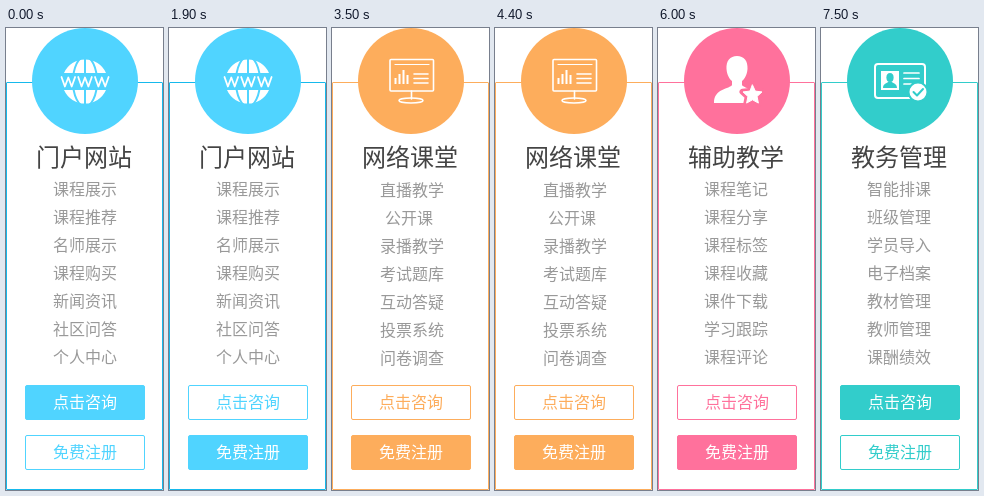
These frames come from a looping animation (157x462 px, 8000 ms). An HTML page:

```html
<!DOCTYPE html>
<html lang="zh-CN">
<head>
<meta charset="utf-8">
<style>
html, body { margin: 0; width: 157px; height: 462px; overflow: hidden; background: #fff; }
svg { display: block; }
text { font-family: "Noto Sans CJK SC", "Noto Sans CJK", sans-serif; text-anchor: middle; }
.icon { fill: none; stroke: #fff; stroke-linecap: round; stroke-linejoin: round; }
.solid { fill: #fff; stroke: none; }
</style>
</head>
<body>
<svg id="stage" width="157" height="462" viewBox="0 0 157 462"></svg>
<script>
const stage = document.getElementById('stage');
const LOOP = 8000, CARD_TIME = 2500, HOVER_AT = 1000;

const globe = c => `
  <path class="solid" d="M58 45A23 23 0 0 1 100 45ZM58 62A23 23 0 0 0 100 62Z"/>
  <g stroke="${c}" stroke-width="2">
    <path d="M79 29V46M79 61V78"/>
    <ellipse cx="79" cy="53.5" rx="12" ry="25"/>
  </g>
  <rect x="53" y="45" width="52" height="17" fill="${c}" stroke="none"/>
  <path stroke-width="1.8" d="${[55.5, 72.2, 89].map(x =>
    `M${x} 49l3.4 9.5 3.4-9 3.4 9 3.4-9.5`).join('')}"/>`;

const board = () => `
  <rect x="58" y="31.5" width="43.5" height="31.5" rx="1" stroke-width="1.6"/>
  <path stroke-width="1.2" d="M63 36.5H97"/>
  <path stroke-width="1.6" d="M79.5 63V71"/>
  <ellipse cx="79" cy="72.5" rx="12" ry="2.5" stroke-width="1.6"/>
  <path stroke-width="2" stroke-linecap="butt" d="M63.5 56V50M67.5 56V46M71.5 56V42M75.5 56V47"/>
  <path stroke-width="1.6" d="M82 46H96M82 50.5H96M82 55H96"/>`;

const star = (x, y, r) => Array.from({ length: 10 }, (_, i) => {
  const a = i * Math.PI / 5 - Math.PI / 2, d = i % 2 ? r * 0.48 : r;
  return (x + d * Math.cos(a)).toFixed(2) + ',' + (y + d * Math.sin(a)).toFixed(2);
}).join(' ');

const student = c => `
  <path class="solid" d="M79 28C86 28 90 33 89.5 41C89 47 86.5 51 84 53V57C86 61 101 60 102 75H56C56 60 72 61 74 57V53C71.5 51 69 47 68.5 41C68 33 72 28 79 28Z"/>
  <polygon points="${star(94.5, 67, 10.5)}" fill="#fff" stroke="${c}" stroke-width="6"/>
  <polygon points="${star(94.5, 67, 10)}" fill="#fff" stroke-width="1"/>`;

const badge = c => `
  <rect x="54" y="36" width="50" height="34" rx="3" stroke-width="2"/>
  <rect class="solid" x="60" y="43" width="18" height="19"/>
  <g fill="${c}" stroke="none">
    <ellipse cx="69" cy="49.5" rx="3.6" ry="4.5"/>
    <path d="M62 60C62 55 66 56 67.5 53.5H70.5C72 56 76 55 76 60Z"/>
  </g>
  <path stroke-width="1.7" d="M83 45H98M83 50.5H98M83 56H90"/>
  <circle cx="97" cy="64" r="9.5" fill="#fff" stroke="${c}" stroke-width="2"/>
  <path stroke="${c}" stroke-width="2" d="M92.5 64L96 67.5L102 61"/>`;

const cards = [
  { color: '#50d4ff', edge: '#16b9ec', icon: globe, title: '门户网站', x: 79, y: 167,
    items: '课程展示 课程推荐 名师展示 课程购买 新闻资讯 社区问答 个人中心' },
  { color: '#fdad5c', edge: '#fdad5c', icon: board, title: '网络课堂', x: 80, y: 168,
    items: '直播教学 公开课 录播教学 考试题库 互动答疑 投票系统 问卷调查' },
  { color: '#ff719c', edge: '#ff719c', icon: student, title: '辅助教学', x: 78, y: 167,
    items: '课程笔记 课程分享 课程标签 课程收藏 课件下载 学习跟踪 课程评论' },
  { color: '#32cdcb', edge: '#32cdcb', icon: badge, title: '教务管理', x: 78, y: 167,
    items: '智能排课 班级管理 学员导入 电子档案 教材管理 教师管理 课酬绩效' }
];

const label = (s, x, y, size, fill) =>
  `<text x="${x}" y="${y}" font-size="${size}" fill="${fill}">${s}</text>`;

const button = (s, y, color, filled) => `
  <rect x="19.5" y="${y + 0.5}" width="119" height="34" rx="1.5"
    fill="${filled ? color : '#fff'}" stroke="${color}"/>
  ${label(s, 79, y + 23, 16, filled ? '#fff' : color)}`;

function draw(card, second) {
  const c = card.color;
  const list = card.items.split(' ').map((s, i) =>
    label(s, s.length < 4 ? card.x - 3 : card.x, card.y + i * 28, 16, '#999')).join('');
  stage.innerHTML = `
    <rect x="0.5" y="54.5" width="156" height="407" rx="0.5" fill="#fff" stroke="${card.edge}"/>
    <circle cx="79" cy="53" r="53" fill="${c}"/>
    <g class="icon">${card.icon(c)}</g>
    ${label(card.title, 78, 138, 24, '#444')}
    ${list}
    ${button('点击咨询', 357, c, !second)}
    ${button('免费注册', 407, c, second)}`;
}

let shown = '';
function update(now) {
  const t = now % LOOP;
  const n = Math.floor(t / CARD_TIME);
  const second = t - n * CARD_TIME >= HOVER_AT;
  const key = n + '-' + second;
  if (key !== shown) {
    shown = key;
    draw(cards[n], second);
  }
}

const start = performance.now();
function tick() {
  update(performance.now() - start);
  requestAnimationFrame(tick);
}
tick();
</script>
</body>
</html>
```
